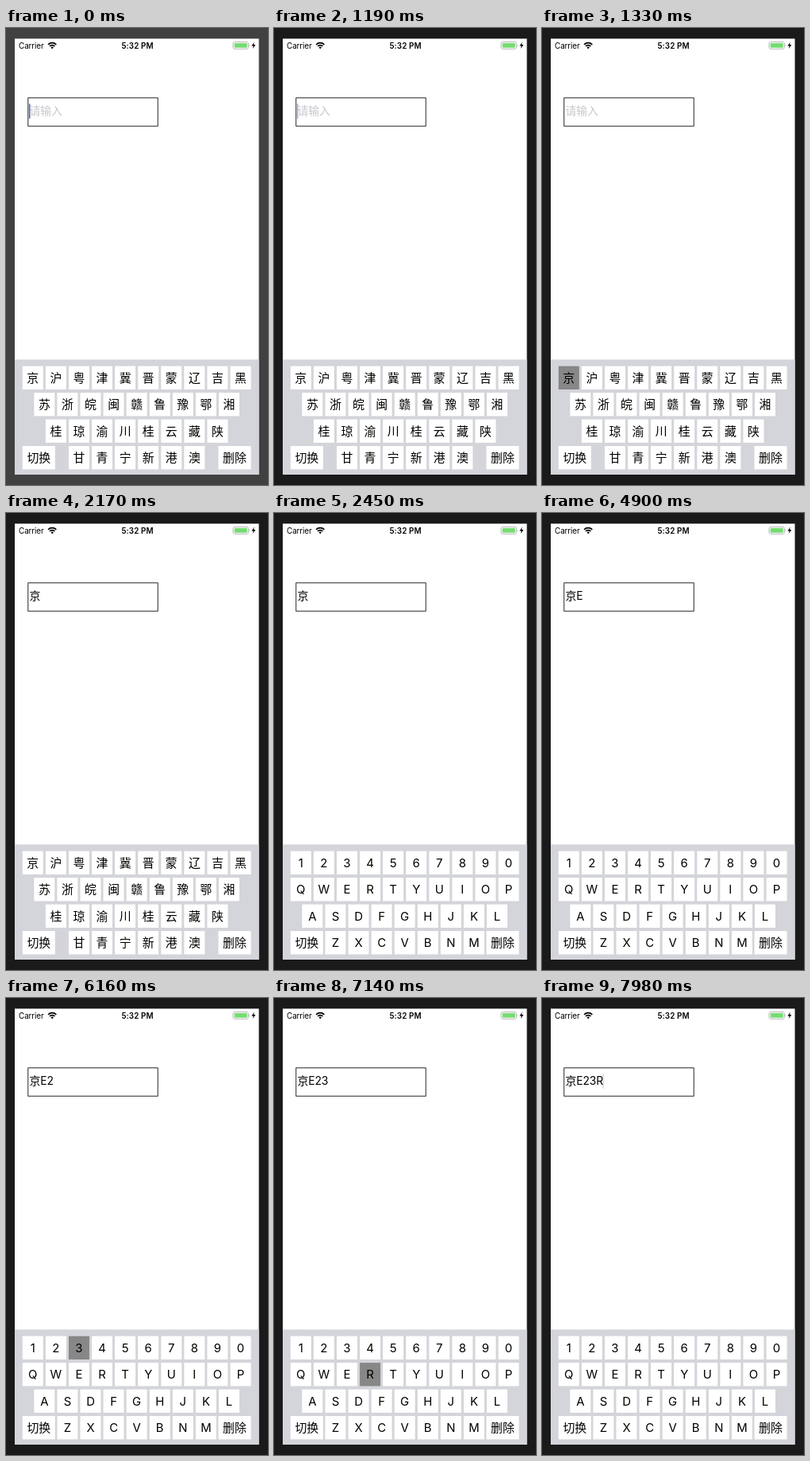
These frames come from a looping animation (330 by 574 pixels, 8 s). An HTML page:

```html
<!DOCTYPE html>
<html lang="zh-CN">
<head>
<meta charset="utf-8">
<title>Plate keyboard</title>
<style>
  html, body { margin: 0; width: 100%; height: 100%; overflow: hidden; background: #1a1a1a; }
  svg { display: block; width: 330px; height: 574px; }
  text { font-family: Inter, "Noto Sans CJK SC", "Noto Sans CJK", sans-serif; }
  .status { font-size: 9.9px; }
  .field { font-size: 13.9px; letter-spacing: -.15px; }
  .key rect { fill: #fff; }
  .key.down rect { fill: #878787; }
  .key text { font-size: 14.9px; text-anchor: middle; }
</style>
</head>
<body>
<svg id="stage" viewBox="0 0 330 574">
  <rect id="bezel" width="330" height="574"/>
  <rect x="11" y="13.4" width="307.5" height="547.6" fill="#fff"/>

  <text class="status" x="16.1" y="25.7" letter-spacing="-.12">Carrier</text>
  <g fill="none" stroke="#000" stroke-width="1.7">
    <path d="M53.1 20.8a7.2 7.2 0 0 1 10.2 0"/>
    <path d="M55 22.9a4.5 4.5 0 0 1 6.4 0"/>
  </g>
  <path d="M58.2 26.2l-1.7-1.8a2.5 2.5 0 0 1 3.4 0z"/>
  <text class="status" x="165.6" y="25.7" text-anchor="middle" font-weight="600" letter-spacing=".1">5:32 PM</text>
  <rect x="286" y="17.5" width="19.4" height="8.8" rx="2.2" fill="#fff" stroke="#a5a5a5" stroke-width=".8"/>
  <rect x="287.6" y="19.1" width="16.2" height="5.6" rx="1" fill="#76dc72"/>
  <path d="M306.3 20.3q1.4 1.5 0 3z" fill="#a5a5a5"/>
  <path d="M312.8 17.6l-3.5 4.8h2.3l-.9 3.6 3.6-4.9h-2.4z"/>

  <rect x="27.8" y="87.8" width="163.4" height="35.4" fill="#fff" stroke="#000" stroke-width=".85"/>
  <text id="entry" class="field" x="29.5" y="109.2"></text>
  <rect id="caret" y="95.3" width="1.6" height="18.4" fill="#5562b8"/>

  <rect x="11" y="416.4" width="307.5" height="144.6" fill="#d3d5da"/>
</svg>
<script>
  const LOOP = 8000, TICK = 70;
  const $ = id => document.getElementById(id);
  const LEFT = 20.8, TOP = 424.7;
  const PITCH = 29.08, ROW_PITCH = 33.45, KEY_W = 26, KEY_H = 29.3;

  function make(tag, attrs, parent) {
    const el = document.createElementNS("http://www.w3.org/2000/svg", tag);
    for (const name in attrs) el.setAttribute(name, attrs[name]);
    return parent.appendChild(el);
  }

  function addKey(board, label, x, row, width = KEY_W) {
    const y = TOP + row * ROW_PITCH;
    const key = make("g", { class: "key" }, board.group);
    make("rect", { x, y, width, height: KEY_H }, key);
    make("text", { x: x + width / 2, y: y + 20 }, key).textContent = label;
    board.keys[label] = key;
  }

  // Each row is centred on the ten-key grid.
  function makeBoard(rows) {
    const board = { group: make("g", {}, $("stage")), keys: {} };
    rows.forEach((row, r) => {
      const left = LEFT + (10 - row.length) * PITCH / 2;
      [...row].forEach((label, i) => addKey(board, label, left + i * PITCH, r));
    });
    addKey(board, "切换", LEFT, 3, 41);
    addKey(board, "删除", 267.5, 3, 41);
    return board;
  }

  const provinces = makeBoard(["京沪粤津冀晋蒙辽吉黑", "苏浙皖闽赣鲁豫鄂湘", "桂琼渝川桂云藏陕", "甘青宁新港澳"]);
  const letters = makeBoard(["1234567890", "QWERTYUIOP", "ASDFGHJKL", "ZXCVBNM"]);

  const SWITCH_AT = 2450, FOCUS_AT = 1190;
  const presses = [
    { board: provinces, label: "京", from: 1260, to: 1400 },
    { board: provinces, label: "切换", from: 2310, to: SWITCH_AT },
    { board: letters, label: "E", from: 3850, to: 3990 },
    { board: letters, label: "2", from: 5180, to: 5320 },
    { board: letters, label: "3", from: 6160, to: 6300 },
    { board: letters, label: "R", from: 7140, to: 7280 }
  ];
  const entries = [
    { at: -490, text: "", caret: 28.9 },
    { at: 1400, text: "京", caret: 42.5 },
    { at: 3990, text: "京E", caret: 50 },
    { at: 5320, text: "京E2", caret: 59.4 },
    { at: 6300, text: "京E23", caret: 68.4 },
    { at: 7280, text: "京E23R", caret: 76.4 }
  ];

  // Solid after typing, then fade out, rest, fade in.
  function caretAlpha(age) {
    if (age < 560) return 1;
    const step = (age - 560) % 1050 / TICK;
    if (step < 8) return Math.max(0, .75 - step * .25);
    return Math.min(1, (step - 7) / 2);
  }

  function draw(t) {
    $("bezel").setAttribute("fill", t < FOCUS_AT ? "#414141" : "#1a1a1a");
    provinces.group.style.display = t < SWITCH_AT ? "" : "none";
    letters.group.style.display = t < SWITCH_AT ? "none" : "";
    for (const p of presses)
      p.board.keys[p.label].classList.toggle("down", t >= p.from && t < p.to);

    const entry = entries.filter(e => e.at <= t).pop();
    $("entry").textContent = entry.text || "请输入";
    $("entry").setAttribute("fill", entry.text ? "#000" : "#c7c7cd");
    $("caret").setAttribute("x", entry.caret);
    $("caret").setAttribute("opacity", caretAlpha(t - entry.at));
  }

  const start = performance.now();
  function frame() {
    const t = (performance.now() - start) % LOOP;
    draw(Math.floor(t / TICK) * TICK);
    requestAnimationFrame(frame);
  }
  frame();
</script>
</body>
</html>
```
